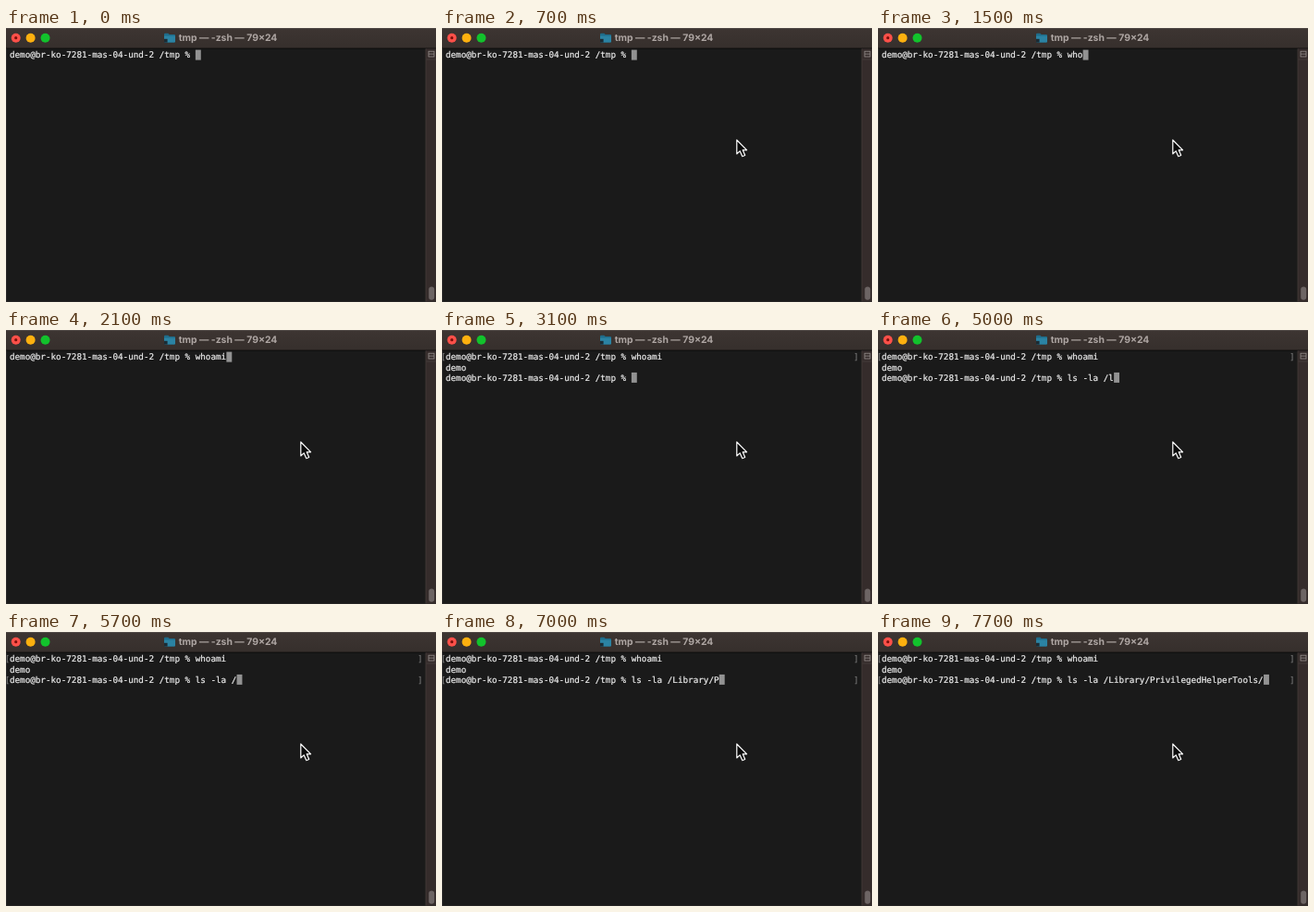
An HTML page for the animation above (8000 ms loop, 465 px wide and 296 px high).

```html
<!DOCTYPE html>
<html lang="en">
<head>
<meta charset="utf-8">
<title>Terminal</title>
<style>
  html, body { margin: 0; width: 100%; height: 100%; overflow: hidden; background: #1a1a1a; }
  svg { display: block; }
  text { white-space: pre; text-rendering: geometricPrecision; }
  .mono {
    font: 9.274px "DejaVu Sans Mono", monospace;
    fill: #ececec; stroke: #ececec; stroke-width: .22px;
  }
  .mark { fill: #858585; stroke: none; }
  .title { font: 700 10.4px Inter, sans-serif; fill: #aea6a3; text-anchor: middle; }
</style>
</head>
<body>
<svg width="465" height="296" viewBox="0 0 465 296">
  <defs>
    <linearGradient id="bar" x2="0" y2="1">
      <stop offset="0" stop-color="#3d3532"/>
      <stop offset="1" stop-color="#362f2c"/>
    </linearGradient>
  </defs>
  <rect width="465" height="296" fill="#1a1a1a"/>

  <!-- title bar -->
  <rect width="465" height="22" fill="url(#bar)"/>
  <rect width="465" height=".7" fill="#57504d"/>
  <rect y="21.6" width="465" height="1" fill="#0d0c0c"/>
  <circle cx="10.7" cy="10.7" r="5" fill="#fe5049"/>
  <circle cx="10.7" cy="10.7" r="1.6" fill="#7c100c"/>
  <circle cx="26.6" cy="10.7" r="5" fill="#fdb00f"/>
  <circle cx="42.5" cy="10.7" r="5" fill="#12c22c"/>
  <path d="M171 6.8q0-1 1-1h3.4l1.3 1.2h5.3q1 0 1 1v6.6q0 1-1 1h-10q-1 0-1-1z" fill="#1f6c8a"/>
  <path d="M171 8.6h12v6q0 1-1 1h-10q-1 0-1-1z" fill="#2b83a3"/>
  <path d="M171 11.8h3.6v3.8h-3.6z" fill="#1b2c34"/>
  <text class="title" x="240" y="14.3">tmp — -zsh — 79×24</text>

  <!-- scroll bar -->
  <rect x="454" y="22.4" width="11" height="273.6" fill="#352c2b"/>
  <rect x="453.6" y="22.4" width=".8" height="273.6" fill="#463d3b"/>
  <rect x="454.4" y="33.6" width="10.6" height=".7" fill="#4a4240"/>
  <g fill="none" stroke="#9a9290" stroke-width=".8">
    <rect x="457" y="25.2" width="6" height="5.8"/>
    <path d="M457 28.1h6"/>
  </g>
  <rect x="457.2" y="279.4" width="6" height="14.4" rx="3" fill="#6d6564"/>
  <path d="M.3 22V296" stroke="#39383a" stroke-width=".6"/>
  <path d="M0 295.7H465" stroke="#302e2e" stroke-width=".6"/>

  <g id="rows"></g>
  <rect id="caret" width="5.9" height="11" fill="#929292"/>
  <path id="pointer" d="M0 0V15L3.4 11.9L6 17.7L8.9 16.5L6.4 10.8H10.8Z"
        fill="#0a0a0a" stroke="#fff" stroke-width="1.2" stroke-linejoin="round"/>
</svg>
<script>
const LOOP = 8000, STEP = 100;
const CHAR = 5.583, LEFT = 3.9, TOP = 23.6, ROW = 11.15;
const USER = "demo";
const PROMPT = USER + "@br-ko-7281-mas-04-und-2 /tmp % ";
const ENTER = 2200, TAB = 5200;

// [time, command line from then on]
const first = [[0, ""], [1300, "w"], [1400, "wh"], [1500, "who"], [1700, "whoa"],
  [1800, "whoam"], [2000, "whoami"]];
const second = [[0, ""], [3300, "l"], [3500, "ls"], [3800, "ls "], [4000, "ls -"],
  [4100, "ls -l"], [4200, "ls -la"], [4300, "ls -la "], [4500, "ls -la /"],
  [4900, "ls -la /l"], [5700, "ls -la /"], [6000, "ls -la /L"], [6200, "ls -la /Li"],
  [6500, "ls -la /Library/"], [7000, "ls -la /Library/P"], [7200, "ls -la /Library/Pr"],
  [7400, "ls -la /Library/Pri"], [7600, "ls -la /Library/PrivilegedHelperTools/"]];

const $ = id => document.getElementById(id);
const at = (keys, t) => keys.filter(k => k[0] <= t).pop()[1];

function addText(x, row, cls, str = "") {
  const el = document.createElementNS("http://www.w3.org/2000/svg", "text");
  el.setAttribute("class", cls);
  el.setAttribute("x", x);
  el.setAttribute("y", TOP + row * ROW + 8.8);
  el.textContent = str;
  $("rows").append(el);
  return el;
}

const lines = [0, 1, 2].map(r => addText(LEFT, r, "mono"));
const marks = [0, 2].map(r => [addText(-1.2, r, "mono mark", "["), addText(445, r, "mono mark", "]")]);
const show = (el, on) => el.setAttribute("visibility", on ? "visible" : "hidden");

function pointerAt(t) {
  if (t < 200) return [435.5, 160];
  const p = Math.min(1, Math.max(0, (t - 300) / 400));
  const e = 1 - (1 - p) ** 2;
  return [361.5 - 42.7 * e, 146 - 25 * e];
}

function draw(time) {
  const t = Math.floor(time % LOOP / STEP) * STEP;
  const done = t >= ENTER;
  const typed = done ? at(second, t) : at(first, t);
  lines[0].textContent = PROMPT + at(first, t);
  lines[1].textContent = done ? USER : "";
  lines[2].textContent = done ? PROMPT + typed : "";
  marks[0].forEach(m => show(m, done));
  marks[1].forEach(m => show(m, t >= TAB));

  const caret = $("caret");
  caret.setAttribute("x", LEFT + (PROMPT + typed).length * CHAR);
  caret.setAttribute("y", TOP + (done ? 2 : 0) * ROW);

  show($("pointer"), t >= 100);
  $("pointer").setAttribute("transform", `translate(${pointerAt(t)})`);
}

const start = performance.now();
function tick(now) {
  draw(Math.max(0, now - start));
  requestAnimationFrame(tick);
}
draw(0);
requestAnimationFrame(tick);
</script>
</body>
</html>
```
